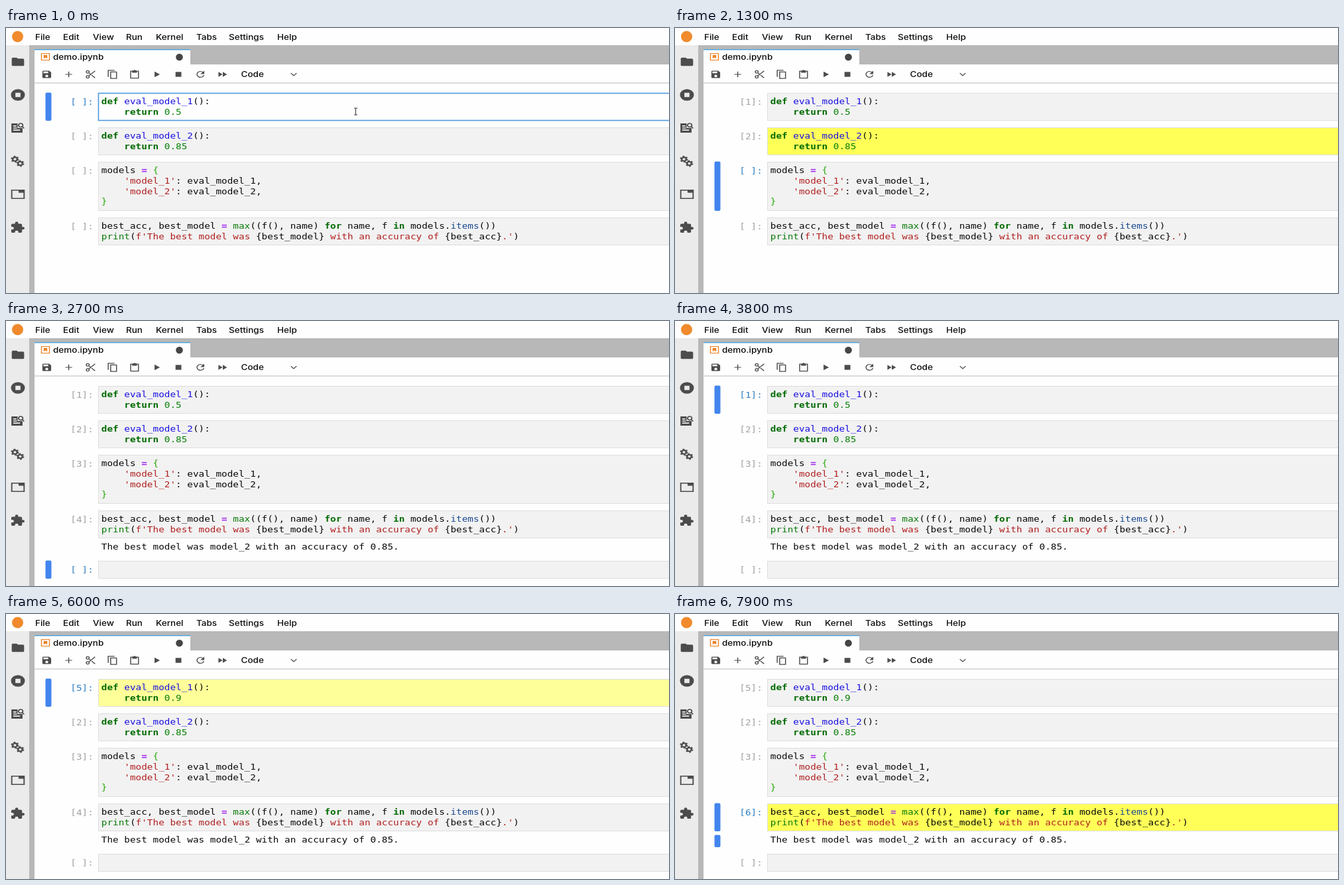
An HTML page with a canvas that plays this animation: 1000 by 400 pixels, repeating every 8000 ms.

```html
<!DOCTYPE html>
<html lang="en">
<head>
<meta charset="utf-8">
<title>Notebook demo</title>
<style>
html, body { margin: 0; width: 100%; height: 100%; overflow: hidden; background: #fff; }
canvas { display: block; }
</style>
</head>
<body>
<canvas id="stage" width="1000" height="400"></canvas>
<script>
const ctx = document.getElementById('stage').getContext('2d');
const LOOP = 8000, STEP = 100;
const ASPECT = 1.195; // the whole screen is wider than tall pixels
const MONO = '"DejaVu Sans Mono", monospace';
const UI = 'Inter, sans-serif';
const CODE_SIZE = 12, CODE_X = 143.8, LINE = 15.7;
const COL = CODE_SIZE * 0.602 * ASPECT;

const PAPER = '#fefefe', SIDE = '#ebebeb', GREY = '#b8b8b8', CELL = '#f2f2f2';
const BLUE = '#4285ee', INK = '#0a0a0a', ICON = '#4c4c4c';
const KEYWORD = '#006a00', BUILTIN = '#0a7a0a', NUMBER = '#0a800a', STRING = '#b02020';
const NAME = '#1a10e0', OPERATOR = '#a020f0', BRACE = '#2aa80c', PROPERTY = '#1c4a90';

const CELLS = [
  { y: 98, h: 42, code: score => ['def eval_model_1():', '    return ' + score] },
  { y: 150, h: 42, code: () => ['def eval_model_2():', '    return 0.85'] },
  { y: 202, h: 74, code: () => ['models = {', "    'model_1': eval_model_1,", "    'model_2': eval_model_2,", '}'] },
  { y: 286, h: 42, code: () => [
    'best_acc, best_model = max((f(), name) for name, f in models.items())',
    "print(f'The best model was {best_model} with an accuracy of {best_acc}.')"] },
  { y: 362, h: 27, code: () => [] }
];
const OUTPUT = 'The best model was model_2 with an accuracy of 0.85.';

// [time, cell]
const RUNS = [[800, 0], [1300, 1], [1700, 2], [1900, 3], [5900, 0], [7900, 3]];
const SELECTS = [[0, 0], [800, 1], [1300, 2], [1700, 3], [1900, 4], [2900, 3], [3100, 2],
  [3300, 1], [3500, 0], [6500, 1], [6700, 2], [6900, 3]];
// [from, to]
const EDITS = [[0, 800], [1900, 2500], [3900, 5900]];
const CARETS = [[1900, 2500], [3900, 4400], [4800, 5900]];
const within = (spans, t) => spans.some(([a, b]) => t >= a && t < b);

const ICONS = {
  folder: { fill: 'M10 4H4a2 2 0 0 0-2 2v12a2 2 0 0 0 2 2h16a2 2 0 0 0 2-2V8a2 2 0 0 0-2-2h-8z' },
  running: { fill: 'M1 12a11 11 0 1 1 22 0a11 11 0 1 1-22 0zM8 8v8h8V8z' },
  inspect: { fill: 'M2 3h10v9h8v9H2zM5 7h5v2H5zM5 11h6v2H5zM5 15h11v2H5z',
    line: 'M13.5 6.5a3.5 3.5 0 1 1 7 0a3.5 3.5 0 1 1-7 0zM19.5 9l3 3.5' },
  tabs: { fill: 'M13 4h9v5h-9z', line: 'M2 4h20v16H2z' },
  puzzle: { fill: 'M20.5 11H19V7a2 2 0 0 0-2-2h-4V3.5a2.5 2.5 0 0 0-5 0V5H4a2 2 0 0 0-2 2v3.8h1.5a2.7 2.7 0 0 1 0 5.4H2V20a2 2 0 0 0 2 2h3.8v-1.5a2.7 2.7 0 0 1 5.4 0V22H17a2 2 0 0 0 2-2v-4h1.5a2.5 2.5 0 0 0 0-5z' },
  save: { fill: 'M17 3H5a2 2 0 0 0-2 2v14a2 2 0 0 0 2 2h14a2 2 0 0 0 2-2V7zM9 16a3 3 0 1 1 6 0a3 3 0 1 1-6 0zM5 5h10v4H5z' },
  add: { line: 'M12 5v14M5 12h14' },
  cut: { line: 'M3 6a3 3 0 1 1 6 0a3 3 0 1 1-6 0zM3 18a3 3 0 1 1 6 0a3 3 0 1 1-6 0zM8.2 8.2L21 20.5M8.2 15.8L21 3.5' },
  copy: { line: 'M8 6h12v16H8zM3 18V2h13' },
  paste: { fill: 'M7 3h2.5a2.6 2.6 0 0 1 5 0H17v5H7z', line: 'M4 4h16v17H4z' },
  play: { fill: 'M8 5v14l11-7z' },
  stop: { fill: 'M6 6h12v12H6z' },
  restart: { fill: 'M20 3v8h-8z', line: 'M17.5 7a7.2 7.2 0 1 0 1.6 7' },
  forward: { fill: 'M4 18l8.5-6L4 6zM13 6v12l8.5-6z' },
  chevron: { line: 'M6 9l6 6 6-6' },
  notebook: { fill: 'M8 7h8v10l-4-3.5-4 3.5z', line: 'M3 3h18v18H3z' }
};

function rect(x, y, w, h, color) {
  ctx.fillStyle = color;
  ctx.fillRect(x, y, w, h);
}

function dot(x, y, r, color) {
  ctx.fillStyle = color;
  ctx.beginPath();
  ctx.arc(x, y, r, 0, Math.PI * 2);
  ctx.fill();
}

function text(str, x, y, font, color) {
  ctx.save();
  ctx.translate(x, y);
  ctx.scale(ASPECT, 1);
  ctx.font = font;
  ctx.fillStyle = color;
  ctx.fillText(str, 0, 0);
  ctx.restore();
}

const mono = (str, x, y, color, bold) =>
  text(str, x, y, `${bold ? 'bold ' : ''}${CODE_SIZE}px ${MONO}`, color);
const label = (str, x, y) => text(str, x, y, `500 11.3px ${UI}`, INK);

function icon(name, x, y, size, color = ICON) {
  const { fill, line } = ICONS[name];
  ctx.save();
  ctx.translate(x, y);
  ctx.scale(size * ASPECT, size);
  ctx.translate(-12, -12);
  ctx.fillStyle = ctx.strokeStyle = color;
  ctx.lineWidth = 2;
  if (fill) ctx.fill(new Path2D(fill), 'evenodd');
  if (line) ctx.stroke(new Path2D(line));
  ctx.restore();
}

function gear(x, y, r) {
  ctx.save();
  ctx.translate(x, y);
  ctx.scale(ASPECT, 1);
  ctx.strokeStyle = ICON;
  const ring = (radius, width, dash) => {
    ctx.lineWidth = width;
    ctx.setLineDash(dash);
    ctx.beginPath();
    ctx.arc(0, 0, radius, 0, Math.PI * 2);
    ctx.stroke();
  };
  ring(r * 0.6, r * 0.45, []);
  ring(r * 0.9, r * 0.35, [r * Math.PI * 0.15]);
  ctx.restore();
}

function codeLine(line, y) {
  const put = (str, col, color, bold) => mono(str, CODE_X + col * COL, y, color, bold);
  let last = '';
  for (const m of line.matchAll(/f?'[^']*'|\d[\d.]*|\w+|\S/g)) {
    const [word] = m;
    let col = m.index;
    if (/'/.test(word)) {
      for (const part of word.split(/(\{.*?\})/)) {
        put(part, col, part[0] === '{' ? INK : STRING);
        col += part.length;
      }
    } else if (/^(def|return|for|in)$/.test(word)) put(word, col, KEYWORD, true);
    else if (/^(max|print)$/.test(word)) put(word, col, BUILTIN);
    else if (/^\d/.test(word)) put(word, col, NUMBER);
    else if (/[{}]/.test(word)) put(word, col, BRACE);
    else if (word === '=') put(word, col, OPERATOR, true);
    else put(word, col, last === 'def' ? NAME : last === '.' ? PROPERTY : INK);
    last = word;
  }
}

function bar(y, h) {
  ctx.fillStyle = BLUE;
  ctx.beginPath();
  ctx.roundRect(59.5, y, 9, h, 2);
  ctx.fill();
}

function drawFrame() {
  rect(0, 0, 1000, 400, PAPER);
  rect(0, 26, 36, 374, SIDE);
  rect(35, 26, 8, 374, GREY);
  rect(43, 26, 957, 29, GREY);
  rect(43, 33, 235, 22, PAPER);
  rect(43, 32, 235, 1.3, '#42a0dc');
  rect(43, 82.5, 957, 1, '#bcbcbc');

  dot(17.5, 13, 8.5, '#f08a2c');
  [['File', 44], ['Edit', 86], ['View', 131], ['Run', 181], ['Kernel', 226],
    ['Tabs', 287], ['Settings', 336], ['Help', 409]].forEach(([s, x]) => label(s, x, 17.5));

  icon('notebook', 59.5, 43.5, 0.56, '#ee8020');
  label('demo.ipynb', 71, 48);
  dot(261.5, 44, 5.3, '#454545');

  ['save', 'add', 'cut', 'copy', 'paste', 'play', 'stop', 'restart', 'forward']
    .forEach((name, i) => icon(name, 61.5 + i * 33.1, 70, 0.615));
  label('Code', 354.5, 73.7);
  icon('chevron', 434, 70, 0.6);

  icon('folder', 18, 51, 0.78);
  icon('running', 18, 101, 0.8);
  icon('inspect', 17.5, 151, 0.78);
  gear(13.5, 198, 4.8);
  gear(21.5, 204.5, 4.6);
  icon('tabs', 18, 251, 0.78);
  icon('puzzle', 17.5, 301, 0.8);
}

// A run lights the cell yellow; it eases out to white, then the plain fill returns.
function cellFill(age) {
  const u = age / 450;
  if (u >= 1) return CELL;
  const blue = Math.round(88 + 167 * (1 - (1 - u) ** 2));
  return `rgb(255, 255, ${blue})`;
}

function drawCell(i, t, selected, editing) {
  const { y, h, code } = CELLS[i];
  const active = i === selected;
  const edit = active && editing;
  let count = ' ', age = Infinity;
  RUNS.forEach(([at, cell], n) => {
    if (cell === i && t >= at) {
      count = n + 1;
      age = t - at;
    }
  });

  rect(139, y, 870, h, edit ? PAPER : cellFill(age));
  ctx.strokeStyle = edit ? '#4f98dc' : '#dedede';
  ctx.lineWidth = edit ? 1.6 : 1;
  ctx.strokeRect(139.5, y + 0.5, 870, h - 1);

  if (active) bar(y - 0.5, h + 0.5);
  mono(`[${count}]:`, 97.3, y + 17.5, active ? '#307fc1' : '#a2a2a2');
  const score = t < 4800 ? '0.5' : t < 5200 ? '0.' : '0.9';
  const lines = code(score);
  lines.forEach((line, n) => codeLine(line, y + 17.2 + n * LINE));

  if (edit && within(CARETS, t)) {
    const row = Math.max(lines.length - 1, 0);
    const col = lines.length ? lines[row].length : 0;
    rect(CODE_X + col * COL + 0.4, y + 5.5 + row * LINE, 1.8, 15.5, '#000');
  }
}

function drawPointer(x, y) {
  ctx.strokeStyle = '#333';
  ctx.lineWidth = 1;
  ctx.stroke(new Path2D(`M${x - 2.5} ${y - 5}h5M${x} ${y - 5}v10M${x - 2.5} ${y + 5}h5`));
}

function draw(now) {
  const t = Math.floor((now % LOOP) / STEP) * STEP;
  const selected = SELECTS.filter(([at]) => t >= at).pop()[1];
  const editing = within(EDITS, t);
  const finished = t >= 1900;

  drawFrame();
  for (let i = 0; i < (finished ? 5 : 4); i++) drawCell(i, t, selected, editing);
  if (finished) {
    mono(OUTPUT, CODE_X, 344.6, INK);
    if (selected === 3) bar(333.5, 18.5);
  }
  if (t < 800) drawPointer(527.5, 126);
}

let start;
function tick(now) {
  start ??= now;
  draw(now - start);
  requestAnimationFrame(tick);
}
draw(0);
requestAnimationFrame(tick);
</script>
</body>
</html>
```
